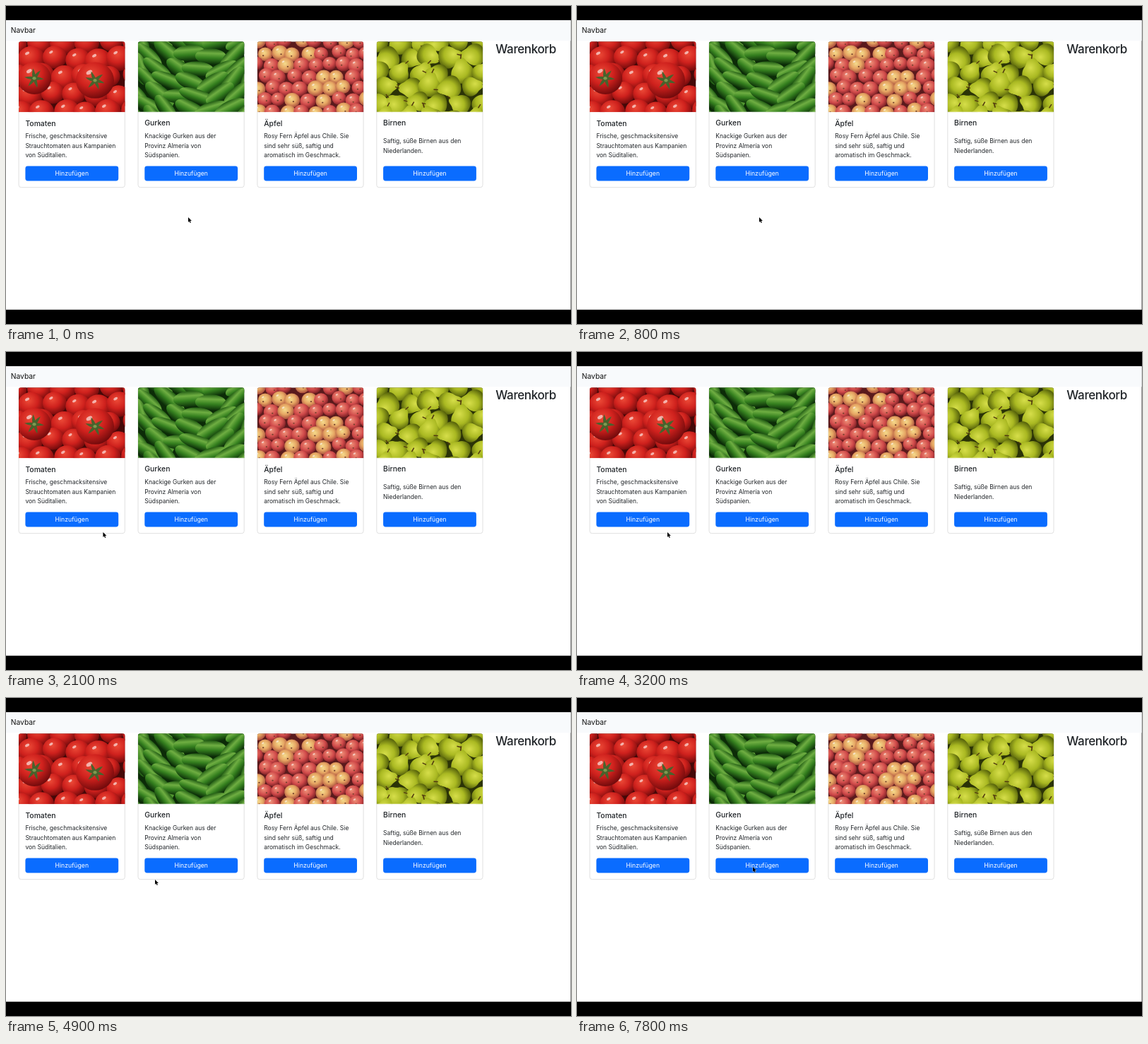
Recreate the animation shown at these times as an HTML page. Size 800x450 px, loop 8000 ms.

```html
<!DOCTYPE html>
<html lang="de">
<head>
<meta charset="utf-8">
<style>
  html, body { margin: 0; width: 100%; height: 100%; overflow: hidden; background: #000; }
  svg { display: block; width: 800px; height: 450px; }
  text { font: 8.5px Inter, sans-serif; fill: #212529; }
  .title { font-size: 10.4px; font-weight: 500; }
  .brand { font-size: 10.3px; fill: #111; }
  .cart { font-size: 17.1px; font-weight: 500; letter-spacing: -.025em; }
  .button { font-size: 8.7px; fill: #fff; text-anchor: middle; }
</style>
</head>
<body>
<svg viewBox="0 0 800 450">
  <defs>
    <radialGradient id="tomato" cx=".4" cy=".33" r=".7">
      <stop stop-color="#ec4a37"/><stop offset=".5" stop-color="#cf211d"/><stop offset="1" stop-color="#6d090b"/>
    </radialGradient>
    <linearGradient id="cucumber" x2="0" y2="1">
      <stop stop-color="#225c14"/><stop offset=".3" stop-color="#6fae42"/><stop offset=".6" stop-color="#35801f"/><stop offset="1" stop-color="#0b2c08"/>
    </linearGradient>
    <radialGradient id="red" cx=".4" cy=".35" r=".7">
      <stop stop-color="#ef9077"/><stop offset=".55" stop-color="#d04a4a"/><stop offset="1" stop-color="#701a20"/>
    </radialGradient>
    <radialGradient id="yellow" cx=".45" cy=".4" r=".7">
      <stop stop-color="#f5db8c"/><stop offset=".45" stop-color="#e6a663"/><stop offset="1" stop-color="#96302f"/>
    </radialGradient>
    <radialGradient id="pear" cx=".4" cy=".38" r=".7">
      <stop stop-color="#d6de4a"/><stop offset=".55" stop-color="#aab922"/><stop offset="1" stop-color="#535f0a"/>
    </radialGradient>
    <clipPath id="photo"><path d="M0 100V3.4Q0 0 3.4 0H147Q150.4 0 150.4 3.4V100Z"/></clipPath>
  </defs>
  <path fill="#fff" d="M0 20.3H799.6V429.7H0Z"/>
  <path fill="#f8fafc" d="M0 20.3H799.6V49.3H0Z"/>
  <text class="brand" x="6.7" y="38.4">Navbar</text>
  <text class="cart" x="693.3" y="67.2">Warenkorb</text>
  <g id="cards"></g>
  <path id="cursor" d="M0 0V7L1.6 5.6L2.6 8L3.8 7.5L2.8 5.1H4.9Z" stroke="#fff" stroke-width=".6" paint-order="stroke"/>
</svg>
<script>
let seed = 7;
const random = () => (seed = seed * 16807 % 2147483647) / 2147483647;
const spread = size => (random() - .5) * size;

const ellipse = (x, y, rx, ry, fill, angle = 0) =>
  `<ellipse rx="${rx}" ry="${ry}" fill="${fill}" transform="translate(${x} ${y}) rotate(${angle})"/>`;

const ball = (x, y, r, fill) => ellipse(x, y, r, r * .95, fill)
  + ellipse(x - r * .3, y - r * .42, r * .17, r * .1, '#ffffff99', -30);

// Fills a photo with fruit on a staggered, jittered grid.
function scatter(dx, dy, draw) {
  let out = '';
  for (let row = 0; row * dy < 115; row++)
    for (let x = row % 2 * dx / 2; x < 165; x += dx)
      out += draw(x + spread(dx * .3), row * dy + spread(dy * .3));
  return out;
}

function stemmedTomato(x, y, r) {
  let out = ball(x, y, r, 'url(#tomato)');
  for (let a = 10; a < 360; a += 60)
    out += `<path d="M0 -2Q7 -3 14 1Q6 3 0 2Z" fill="#48622c" transform="translate(${x} ${y}) rotate(${a + spread(20)})"/>`;
  return out + ellipse(x, y, 2.6, 2.2, '#7d9850');
}

const tomatoes = () =>
  scatter(32, 25, (x, y) => ball(x, y, 17 + spread(5), 'url(#tomato)'))
  + stemmedTomato(22, 52, 24) + stemmedTomato(108, 55, 27);

const cucumbers = () => scatter(29, 19, (x, y) =>
  ellipse(x, y, 25 + spread(6), 10.5 + spread(2), 'url(#cucumber)', 65 - x * .75 + spread(40)));

const apples = () => scatter(20.5, 16.5, (x, y) =>
  ball(x, y, 10.8 + spread(2), random() < .55 ? 'url(#red)' : 'url(#yellow)')
  + ellipse(x + spread(6), y + 2, 1.2, .9, '#73412c'));

const pears = () => scatter(30, 22, (x, y) =>
  `<g transform="translate(${x} ${y}) rotate(${spread(240)}) scale(${14.5 + spread(3)})">
    <path fill="url(#pear)" d="M0 1C-1.3 1 -1.2 -.15 -.7 -.6C-.45 -.85 -.45 -1.3 0 -1.3S.45 -.85 .7 -.6C1.2 -.15 1.3 1 0 1Z"/>
    <path fill="none" stroke="#51380f" stroke-width=".1" d="M0 -1.2L.12 -1.6"/>
  </g>`);

const products = [
  ['Tomaten', ['Frische, geschmacksitensive', 'Strauchtomaten aus Kampanien', 'von Süditalien.'], tomatoes, '#450808', 100.4],
  ['Gurken', ['Knackige Gurken aus der', 'Provinz Almería von', 'Südspanien.'], cucumbers, '#0c2b08', 99.6],
  ['Äpfel', ['Rosy Fern Äpfel aus Chile. Sie', 'sind sehr süß, saftig und', 'aromatisch im Geschmack.'], apples, '#5a1a1c', 100.4],
  ['Birnen', ['Saftig, süße Birnen aus den', 'Niederlanden.'], pears, '#2b3307', 99.6]
];

document.getElementById('cards').innerHTML = products.map(([name, lines, paint, shade, height], i) => `
  <g transform="translate(${18 + i * 168.9} 50.2)">
    <rect x=".1" y=".1" width="150.2" height="206.4" rx="3.4" fill="#fff" stroke="#d8d8d8" stroke-width=".8"/>
    <g clip-path="url(#photo)">
      <rect width="150.4" height="100" fill="${shade}"/>${paint()}
      <rect y="${height}" width="150.4" height="5" fill="#fff"/>
    </g>
    <text class="title" x="9.4" y="${height + 19.5}">${name}</text>
    ${lines.map((line, n) => `<text x="9.4" y="${137.2 + (3 - lines.length) * 6.7 + n * 13.5}">${line}</text>`).join('')}
    <rect x="9.4" y="176.3" width="131.8" height="21" rx="3.4" fill="#0a6cff"/>
    <text class="button" x="75.3" y="190.2">Hinzufügen</text>
  </g>`).join('');

// time, x, y of the pointer tip
const path = [
  [0, 258, 299], [900, 258, 299], [1200, 225, 290], [1800, 140, 255], [3200, 128, 255],
  [4500, 211, 257], [5800, 211, 257], [6200, 225, 255], [7600, 249, 239], [8000, 249, 239]
];
const cursor = document.getElementById('cursor');

function frame(now) {
  const t = Math.floor(now % 8000 / 100) * 100;
  const i = path.findIndex(([time]) => time > t);
  const [t0, x0, y0] = path[i - 1], [t1, x1, y1] = path[i];
  const k = (t - t0) / (t1 - t0);
  cursor.setAttribute('transform', `translate(${x0 + (x1 - x0) * k} ${y0 + (y1 - y0) * k})`);
  requestAnimationFrame(frame);
}
frame(0);
</script>
</body>
</html>
```
